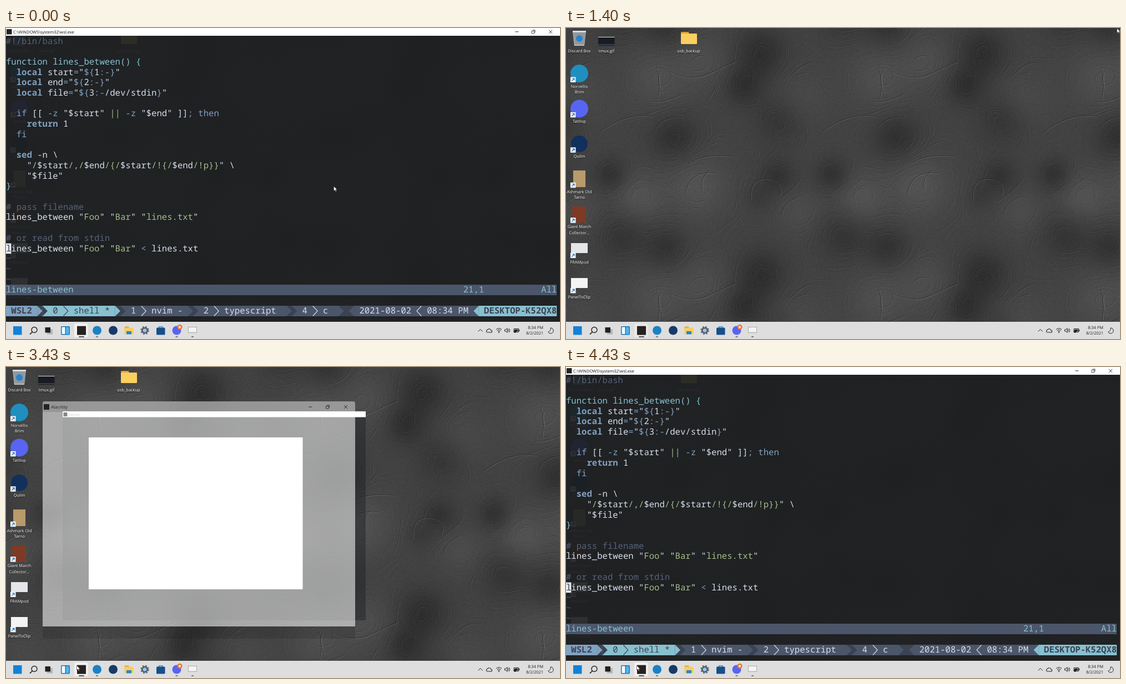
Animation, 998 px wide and 561 px high, one loop 4630 ms. Source, as an HTML page with a canvas:

```html
<!DOCTYPE html>
<html lang="en">
<head>
<meta charset="utf-8">
<title>Closing and reopening a terminal</title>
<style>
html, body { margin: 0; width: 100%; height: 100%; overflow: hidden; background: #444; }
canvas { display: block; }
</style>
</head>
<body>
<canvas width="998" height="561"></canvas>
<script>
const LOOP = 4630, CELL = 9.36, ROW = 18.7, TOP = 14.5;
const UI = '"Open Sans", "Noto Sans", sans-serif';
const MONO = '"Noto Sans Mono", "DejaVu Sans Mono", monospace';
const stage = document.querySelector('canvas').getContext('2d');
let g = stage;

// drawing helpers
function layer(w, h, draw) {
  const c = document.createElement('canvas');
  c.width = w; c.height = h;
  g = c.getContext('2d');
  draw();
  g = stage;
  return c;
}
function box(x, y, w, h, fill) { g.fillStyle = fill; g.fillRect(x, y, w, h); }
function round(x, y, w, h, r, fill) {
  g.fillStyle = fill; g.beginPath(); g.roundRect(x, y, w, h, r); g.fill();
}
function disc(x, y, r, fill) {
  g.fillStyle = fill; g.beginPath(); g.arc(x, y, r, 0, 7); g.fill();
}
function ring(x, y, r, color, w) {
  g.strokeStyle = color; g.lineWidth = w; g.beginPath(); g.arc(x, y, r, 0, 7); g.stroke();
}
function shape(d, fill) { g.fillStyle = fill; g.fill(new Path2D(d)); }
function line(d, color, w = 1) { g.strokeStyle = color; g.lineWidth = w; g.stroke(new Path2D(d)); }
function text(s, x, y, fill, align = 'left', size = 7.45) {
  g.font = `${size}px ${UI}`;
  g.textRendering = 'geometricPrecision';
  g.textAlign = align; g.textBaseline = 'alphabetic';
  g.fillStyle = fill;
  g.fillText(s, x, y);
}

// wallpaper: a 400 px tile of soft hills with creases along their contours
let seed = 7;
const rnd = () => (seed = seed * 16807 % 2147483647) / 2147483647;
const hills = [
  [350, 45, 45, -20], [318, 105, 35, -18], [195, 197, 42, -18], [385, 165, 45, -14],
  [80, 265, 30, -18], [380, 268, 32, -16], [100, 375, 45, -14], [180, 395, 38, -16],
  [345, 305, 25, -8], [165, 90, 55, 12], [250, 60, 48, 10], [130, 305, 45, 16],
  [235, 285, 55, 16], [20, 130, 50, 8], [20, 330, 40, 9]
];
const wrap = d => ((d % 400) + 600) % 400 - 200;
const height = (x, y) => hills.reduce((sum, [hx, hy, r, a]) =>
  sum + a * Math.exp(-(wrap(x - hx) ** 2 + wrap(y - hy) ** 2) / (r * r)), 0);

function crease(d, k) {
  const path = new Path2D(d);
  for (const dx of [-400, 0, 400]) for (const dy of [-400, 0, 400]) {
    g.save();
    g.translate(dx, dy);
    g.lineWidth = .8;
    g.strokeStyle = `rgba(0,0,0,${k})`; g.stroke(path);
    g.translate(1, 1);
    g.strokeStyle = `rgba(255,255,255,${k * .45})`; g.stroke(path);
    g.restore();
  }
}

const tile = layer(400, 400, () => {
  const img = g.createImageData(400, 400);
  for (let i = 0; i < 160000; i++) {
    const v = 66 + height(i % 400, i / 400 | 0) + (rnd() - .5) * 9;
    img.data.set([v, v, v, 255], i * 4);
  }
  g.putImageData(img, 0, 0);
  for (let n = 0; n < 420; n++) {
    let x = rnd() * 400, y = rnd() * 400, d = `M${x} ${y}`;
    const steps = 8 + rnd() * 18;
    for (let i = 0; i < steps; i++) {
      const gx = height(x + 1, y) - height(x - 1, y), gy = height(x, y + 1) - height(x, y - 1);
      const m = Math.hypot(gx, gy) || 1;
      x -= gy / m * 2.4; y += gx / m * 2.4;
      d += `L${x} ${y}`;
    }
    crease(d, .06 + rnd() * .14);
  }
  ['M163 70Q172 95 166 126', 'M170 78Q162 95 174 118', 'M185 78Q225 98 258 82T306 60',
    'M215 300Q222 255 270 262', 'M246 292Q240 270 258 258', 'M60 188Q110 150 158 160',
    'M220 245Q250 225 300 232', 'M333 310Q330 270 362 272T384 305']
    .forEach(d => crease(d, .4));
});

// desktop
function folder(x, y, w, h) {
  round(x, y, w * .5, h * .6, 1.5, '#e0a32e');
  round(x, y + h * .14, w, h * .86, 1.5, '#f8cf60');
}
function label(s, x, y) {
  g.shadowColor = '#000'; g.shadowBlur = 2; g.shadowOffsetY = .6;
  s.split('|').forEach((part, i) => text(part, x, y + i * 10.3, '#fff', 'center'));
  g.shadowColor = 'transparent';
}
function shortcut(y) {
  box(8, y, 9.5, 9.5, '#f5f8fb');
  line(`M10.3 ${y + 7.2}L14.8 ${y + 2.7}M11.5 ${y + 2.5}H15V${y + 6}`, '#1668b8', 1.1);
}

const desktop = layer(998, 530, () => {
  g.fillStyle = g.createPattern(tile, 'repeat');
  g.fillRect(0, 0, 998, 530);

  shape('M12 6H36L33 32H15Z', '#b9bdc0');
  shape('M13 8H35L33 30H16Z', '#92989c');
  box(12, 5, 24, 2.5, '#dfe2e4');
  disc(24, 19, 6, '#2584d0');
  label('Discard Box', 24, 44);

  box(58, 16, 29.5, 16, '#191c22');
  box(58, 16, 29.5, 1, '#ddd');
  box(58, 29.5, 29.5, 1, '#59657a');
  label('tmux.gif', 73, 44);
  folder(207, 7, 29, 22);
  label('usb_backup', 221, 44);

  disc(24, 82, 16, '#1f8fc0');
  disc(24, 145.5, 16, '#5865f2');
  disc(24, 209, 15, '#12305c');
  round(13, 257, 22, 30, 0, '#b99a6c');
  round(11, 322, 25, 29, 0, '#7d3a25');
  box(9, 388, 30, 18, '#e4e6e9');
  box(9, 451, 30, 18, '#f4f4f4');
  ['Norvellix|Brim', 'Tattlop', 'Quilm', 'Ashmark Old|Tarno', 'Giant March|Collector...',
    'FRAMpod', 'PanelToClip'].forEach((name, i) => {
    shortcut(88.5 + i * 63.4);
    label(name, 24, 107.6 + i * 63.4);
  });
});

// taskbar without the terminal button
const taskbar = layer(998, 31, () => {
  const ink = '#222';
  g.translate(0, -530);
  box(0, 530, 998, 31, '#dedede');
  box(0, 530, 998, 1, '#e6e6e6');
  box(13, 538, 15.5, 15.5, '#1481d6');
  ring(51, 544.5, 5, ink, 1.4);
  line('M47.4 548.2L43 552.6', ink, 1.6);
  box(74, 543, 10, 9.5, '#b4b4b4');
  box(70.5, 540, 9.5, 9.5, '#202020');
  round(99, 538, 16, 15.5, 1.5, '#1478c0');
  box(100.5, 539.5, 6, 12.5, '#f7fbff');
  box(108, 539.5, 5.5, 12.5, '#55b4ec');
  disc(164, 545.5, 8, '#1a82c4');
  disc(193, 545.5, 8, '#173a68');
  folder(213.5, 538.5, 16, 14);
  box(217, 547, 9, 5.5, '#2d82cc');
  g.setLineDash([2.7, 2.8]);
  ring(250, 545.5, 6.8, '#56616d', 2);
  g.setLineDash([]);
  ring(250, 545.5, 4.6, '#56616d', 3);
  disc(250, 545.5, 2.6, '#8fc4ee');
  line('M275.5 541V538.8H282V541', '#2a7ac2', 1.2);
  round(271, 540.5, 15.5, 13, 1.5, '#174f8b');
  disc(307.5, 545.5, 8, '#5865f2');
  disc(313, 539.5, 4.7, '#ea7a35');
  disc(313, 539.5, 2, '#fff');
  box(328, 539, 16, 10.5, '#8a8a8a');
  box(328.7, 539.7, 14.6, 9.1, '#f4f4f4');
  for (const x of [164, 307.5, 336]) round(x - 2.2, 556, 4.4, 2, 1, '#777');

  line('M850.5 547.5L854.5 543.5L858.5 547.5', ink);
  line('M867 549H873.5A2 2 0 0 0 873.5 545A3.3 3.3 0 0 0 867.4 544.5A2.3 2.3 0 0 0 867 549Z', ink, 1.1);
  line('M883 543.8Q888 539.8 893 543.8M884.7 546Q888 543 891.3 546M886.3 548Q888 546.6 889.7 548', ink);
  disc(888, 549.3, .9, ink);
  line('M898.5 544H900.5L903 541.5V549.5L900.5 547H898.5Z', ink);
  line('M904.5 543.5Q906.2 545.5 904.5 547.5M906.3 542Q909 545.5 906.3 549', ink);
  line('M915 542.5H923.5V548.5H915Z', ink);
  box(916.3, 543.8, 6, 3.5, ink);
  box(924, 544.2, 1.2, 2.6, ink);
  disc(917, 547.5, 2.4, ink);
  text('8:34 PM', 968, 543, ink, 'right');
  text('8/2/2021', 968, 553, ink, 'right');
  line('M981 541A5 5 0 1 1 976.6 548.4A6 6 0 0 0 981 541Z', ink);
});

// terminal text; ^x switches colour
const colors = {
  c: '#576279', b: '#81a1c1', B: '#81a1c1', f: '#88c0d0', w: '#d8dee9', s: '#a3be8c', k: '#3b4252', K: '#3b4252'
};
function mono(src, col, row) {
  let key = 'w';
  g.textAlign = 'left'; g.textBaseline = 'alphabetic';
  g.textRendering = 'geometricPrecision';
  for (let i = 0; i < src.length; i++) {
    if (src[i] === '^') { key = src[++i]; continue; }
    g.font = `${'BK'.includes(key) ? 'bold ' : ''}15.6px ${MONO}`;
    g.fillStyle = colors[key];
    g.fillText(src[i], col++ * CELL, TOP + row * ROW + 14);
  }
}
const code = String.raw`^c#!/bin/bash

^ffunction lines_between() {
  ^Blocal ^wstart^b=^w"^b${'$'}{^w1^b:-}^w"
  ^Blocal ^wend^b=^w"^b${'$'}{^w2^b:-}^w"
  ^Blocal ^wfile^b=^w"^b${'$'}{^w3^b:-^w/dev/stdin^b}^w"

  ^bif ^w[[ ^b-z ^w"$start" ^s|| ^b-z ^w"$end" ]]^b; then
    ^Breturn ^w1
  ^bfi

  ^Bsed ^w-n \
    "^s/^w$start^s/,/^w$end^s/{/^w$start^s/!{/^w$end^s/!p}}^w" \
    "$file"
^f}

^c# pass filename
lines_between "^sFoo^w" "^sBar^w" "^slines.txt^w"

^c# or read from stdin
lines_between "^sFoo^w" "^sBar^w" ^b< ^wlines.txt
^c~
^c~
^c~`.split('\n');

const BAR = 501, BAR_H = 19;
const cells = (from, to, fill) => box(from * CELL, BAR, (to - from) * CELL, BAR_H, fill);
function arrow(col, fill, left) {
  const a = (col + (left ? 1 : 0)) * CELL, b = (col + (left ? 0 : 1)) * CELL;
  shape(`M${a} ${BAR}L${b} ${BAR + BAR_H / 2}L${a} ${BAR + BAR_H}Z`, fill);
}
function chevron(col, color, left) {
  const a = (col + (left ? .95 : .05)) * CELL, b = (col + (left ? .05 : .95)) * CELL;
  line(`M${a} ${BAR + .5}L${b} ${BAR + BAR_H / 2}L${a} ${BAR + BAR_H - .5}`, color, 1.1);
}

const editor = layer(998, 530, () => {
  const { k: dark, b: blue, f: cyan, w: pale } = colors, gray = '#4c566a';
  code.forEach((src, row) => mono(src, 0, row));
  box(0, TOP + 20 * ROW, CELL, ROW, '#e5e9f0');
  mono('^kl', 0, 20);

  box(0, 463, 992, 19, gray);
  mono('^flines-between', 0, 24);
  mono('^f21,1', 88, 24);
  mono('^fAll', 103, 24);

  cells(0, 106, dark);
  cells(0, 6, blue); arrow(6, blue);
  for (const [from, to, fill] of [[7, 21, cyan], [22, 35, gray], [36, 54, gray], [55, 64, gray]]) {
    cells(from, to, fill);
    arrow(from, dark);
    arrow(to, fill);
    chevron(from + 4, fill === cyan ? dark : pale);
  }
  arrow(66, gray, true); cells(67, 90, gray);
  chevron(79, pale, true);
  arrow(90, cyan, true); cells(91, 106, cyan);
  // the arrow into the last segment sits on gray
  cells(90, 91, gray); arrow(90, cyan, true);
  mono('^KWSL2', 1, 26);
  mono('^k0   shell *', 9, 26);
  mono('1   nvim -', 24, 26);
  mono('2   typescript', 38, 26);
  mono('4   c', 57, 26);
  mono('2021-08-02   08:34 PM', 68, 26);
  mono('^KDESKTOP-K52QX8', 92, 26);
});

// moving parts
const path = [
  [0, 590, 285], [200, 988, 0], [400, 992, 0], [1590, 405, 281],
  [1820, 293, 407], [2010, 173, 491], [2210, 127, 533], [2410, 127, 538]
];
function pointer(t) {
  const [, x, y] = path.findLast(p => t >= p[0]);
  g.save();
  g.translate(x, y);
  const d = 'M.5 .5V9L2.5 7.2L4 10.3L5.3 9.7L3.9 6.7H6.7Z';
  shape(d, '#fff');
  line(d, '#222', .6);
  g.restore();
}
function buttons(x, y, gap, ink, closeInk) {
  line(`M${x} ${y}h6.5`, ink, .9);
  line(`M${x + gap} ${y - 1.5}h4.5v4.5h-4.5zM${x + gap + 1.5} ${y - 3}h4.5v4.5`, ink, .8);
  const c = x + gap * 2 + 1;
  line(`M${c} ${y - 3}l6 6m0 -6l-6 6`, closeInk, .9);
}
function titleBar(t) {
  const hover = t >= 200 && t < 1400;
  box(0, 0, 998, 14, '#fff');
  box(1, 2, 9.5, 9.5, '#26221f');
  text('C:\\WINDOWS\\system32\\wsl.exe', 13, 9.7, '#111');
  if (hover) box(967, 0, 30, 14, t < 400 ? '#d0473a' : t < 1200 ? '#c42b1c' : '#c83c31');
  buttons(917, 6.8, 30, '#222', !hover ? '#222' : t < 1200 ? '#fff' : '#e7b3ae');
}
function opening() {
  box(66, 468, 563, 22, 'rgba(0,0,0,.12)');
  box(102, 90, 546, 367, 'rgba(30,32,34,.45)');
  round(66, 62, 563, 406, [4, 4, 0, 0], 'rgba(255,255,255,.55)');
  round(66, 62, 563, 19, [4, 4, 0, 0], 'rgba(125,125,125,.45)');
  box(68, 67, 10, 10, '#26221f');
  text('Alacritty', 81, 75, '#222', 'left', 7.9);
  buttons(545, 72, 31.5, '#222', '#222');
  box(102, 80, 546, 10.5, '#fff');
  box(103.5, 82, 7, 7, '#8a8886');
  text('Alacritty', 112, 87.5, '#ccc', 'left', 5.5);
  box(149, 127, 385.5, 274, '#fff');
}
function terminalButton(t) {
  const active = t < 1590 || t >= 3430, hover = t >= 2210;
  if (active || hover) {
    round(123, 533, 24.5, 24.5, 2.5, t >= 1400 && t < 1590 ? 'rgba(255,255,255,.35)' : 'rgba(255,255,255,.6)');
  }
  const lift = t >= 2630 && t < 2830 ? 2 : 0;
  const size = t >= 3030 && t < 3230 ? 14.5 : 16;
  box(136 - size / 2, 545.7 - size / 2 - lift, size, size, '#26221f');
  const width = active ? 10 : t < 1820 ? 5 : 0;
  if (width) round(136 - width / 2, 556, width, 2, 1, '#555');
}

function draw(now) {
  const t = now % LOOP;
  g.drawImage(desktop, 0, 0);
  if (t >= 3430 && t < 3640) opening();
  if (t < 1400 || t >= 3640) {
    box(0, 14, 998, 516, 'rgba(29,31,33,.92)');
    titleBar(t);
    if (t >= 3640 && t < 3840) box(0, TOP, CELL, ROW, '#e0e9ee');
    else g.drawImage(editor, 0, 0);
  }
  g.drawImage(taskbar, 0, 530);
  terminalButton(t);
  pointer(t);
  if (t >= 3230 && t < 3430) ring(136, 538.5, 3.2, '#2fa4dc', 1.8);
  requestAnimationFrame(draw);
}
requestAnimationFrame(draw);
</script>
</body>
</html>
```
